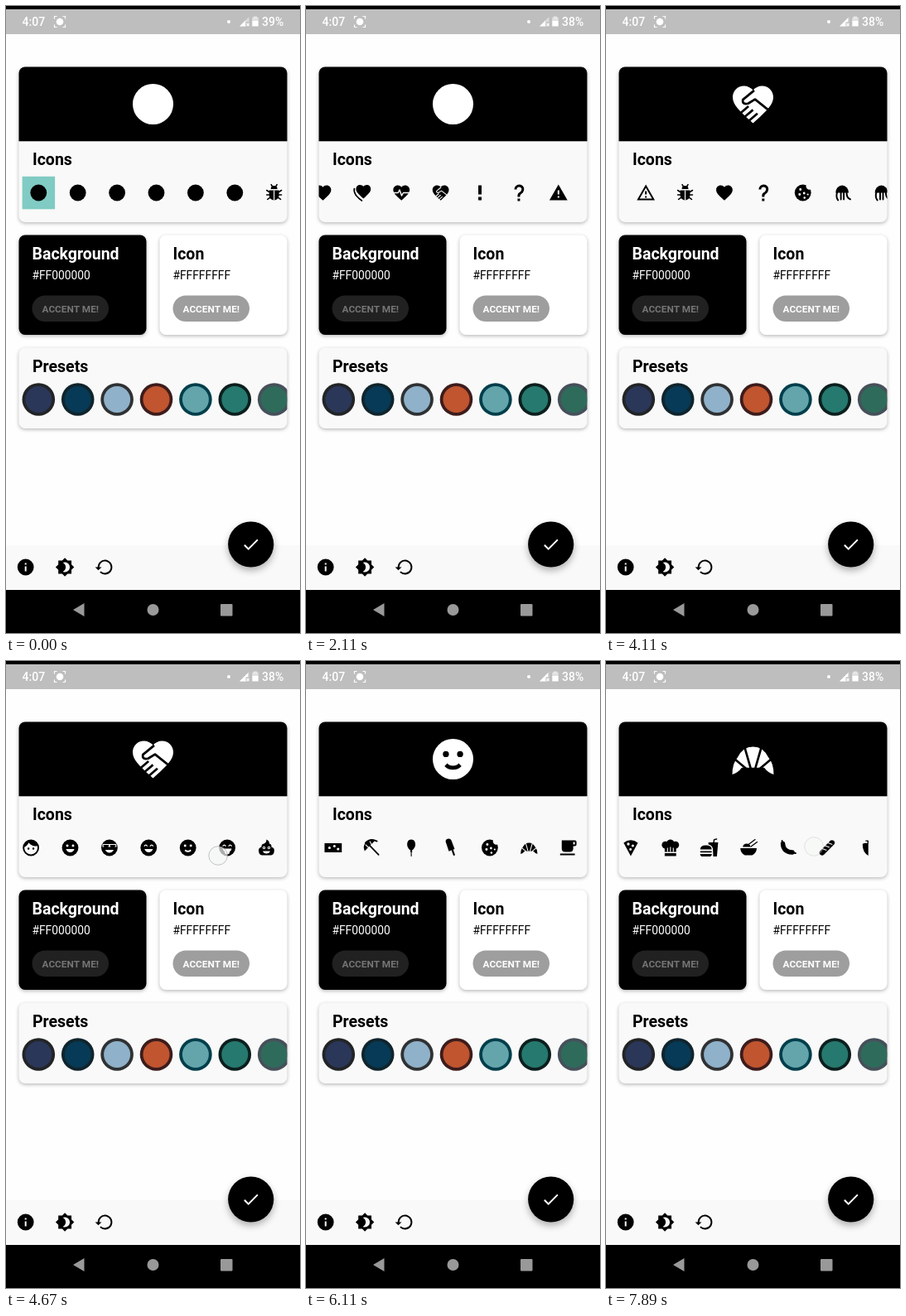
Recreate the animation shown at these times as an HTML page with a canvas. Size 355 by 757 pixels, loop 8000 ms.

```html
<!DOCTYPE html>
<html lang="en">
<head>
<meta charset="utf-8">
<title>Icon picker</title>
<style>
  html, body { margin: 0; width: 100%; height: 100%; overflow: hidden; background: #fdfefd; }
  canvas { display: block; }
</style>
</head>
<body>
<canvas id="stage" width="355" height="757"></canvas>
<script>
const ctx = document.getElementById('stage').getContext('2d');
const LOOP = 8000, PITCH = 47.4, FIRST = 39.3;
const PAGE = '#fdfefd', CARD = '#f8f9f8', TEAL = '#80cbc4';

const dot = (x, y, r) => `M${x - r} ${y}a${r} ${r} 0 1 0 ${2 * r} 0a${r} ${r} 0 1 0 ${-2 * r} 0Z`;
const DISC = 'F ' + dot(12, 12, 10);
const EYES = 'X ' + dot(8.5, 9.5, 1.5) + dot(15.5, 9.5, 1.5);
const ARC_EYES = 'C1.4 M6.5 10.2Q8.5 7 10.3 10.2M13.7 10.2Q15.5 7 17.5 10.2';
const GRIN = 'X M12 17.5C9.67 17.5 7.69 16.04 6.89 13.5H17.11C16.31 16.04 14.33 17.5 12 17.5Z';
const HEART = 'F M12 21.35L10.55 20.03C5.4 15.36 2 12.27 2 8.5C2 5.41 4.42 3 7.5 3C9.24 3 10.91 3.81 12 5.08C13.09 3.81 14.76 3 16.5 3C19.58 3 22 5.41 22 8.5C22 12.27 18.6 15.36 13.45 20.03Z';

// Layers on a 24-unit grid: F fill, X fill in backdrop, S stroke, C stroke in backdrop (with width).
const ICONS = {
  disc: [DISC],
  bug: ['F M8 7.5A4 4 0 0 1 16 7.5ZM6 9H18V15A6 6 0 0 1 6 15Z', 'C1.2 M12 9V21',
    'S1.6 M8.5 2L10 4.5M15.5 2L14 4.5M3 9L6 11M21 9L18 11M3 14.5H6M21 14.5H18M4 20L7 18M20 20L17 18'],
  heart: [HEART],
  hearts: ['F M13.5 19L12 17.7C7.6 13.7 4.5 11 4.5 7.5C4.5 4.5 6.8 2.5 9.3 2.5C11 2.5 12.5 3.2 13.5 4.4C14.5 3.2 16 2.5 17.7 2.5C20.3 2.5 22.5 4.5 22.5 7.5C22.5 11 19.4 13.7 15 17.7Z',
    'S1.7 M2.4 7C1 13 6 17 11.5 21.6'],
  pulse: [HEART, 'C1.5 M1 12H8L9.7 8.5L12.3 15.5L14.3 12H23'],
  hands: [HEART, 'C1.1 M12.6 5.2L7 9.8Q6.6 12.4 9.6 11.7L13 9.6L20 15.2M9.8 13L5.4 16.8M12 14.8L7.6 18.5M14.2 16.6L9.8 20.4'],
  bang: ['F M10 3H14V14H10ZM10 17H14V21H10Z'],
  help: ['F M10 19H13V22H10V19M12 2C17.35 2.22 19.68 7.62 16.5 11.67C15.67 12.67 14.33 13.33 13.67 14.17C13 15 13 16 13 17H10C10 15.33 10 13.92 10.67 12.92C11.33 11.92 12.67 11.33 13.5 10.67C15.92 8.43 15.32 5.26 12 5A3 3 0 0 0 9 8H6A6 6 0 0 1 12 2Z'],
  alert: ['F M13 14H11V9H13ZM13 18H11V16H13ZM1 21H23L12 2Z'],
  alertLine: ['F M12 2L1 21H23ZM12 6L19.53 19H4.47ZM11 10V14H13V10ZM11 16V18H13V16Z'],
  jelly: ['F M4 12A8 9 0 0 1 20 12Z', 'S2 M6 11Q4 17 7 21M10.5 11V20M14 11V20M17.5 11Q17 18 22 20'],
  face: ['F ' + dot(9, 13, 1.25) + dot(15, 13, 1.25) + dot(12, 12, 10) +
    'M12 20C7.59 20 4 16.41 4 12C4 11.71 4 11.42 4.05 11.14C6.41 10.09 8.28 8.16 9.26 5.77C11.07 8.33 14.05 10 17.42 10C18.2 10 18.95 9.91 19.67 9.74C19.88 10.45 20 11.21 20 12C20 16.41 16.41 20 12 20Z'],
  smiley: [DISC, EYES, GRIN],
  cool: [DISC, 'X M3.5 7.5H20.5V11H3.5Z', 'F M4.5 8.5H11.2Q11 12.5 8 12.5T4.5 8.5ZM12.8 8.5H19.5Q19 12.5 16 12.5T12.8 8.5Z',
    'X M12 18C9.6 18 7.7 16.8 6.9 14.6H17.1C16.3 16.8 14.4 18 12 18Z'],
  happy: [DISC, ARC_EYES, GRIN],
  smile: [DISC, EYES, 'X M12 17.23C10.25 17.23 8.71 16.5 7.81 15.42L9.23 14C9.68 14.72 10.75 15.23 12 15.23C13.25 15.23 14.32 14.72 14.77 14L16.19 15.42C15.29 16.5 13.75 17.23 12 17.23Z'],
  tongue: [DISC, ARC_EYES, 'X M6.5 13H17.5Q17 16 15 16.5V17A3 3 0 0 1 9 17V16.5Q7 16 6.5 13Z', 'C1 M12 16V19'],
  swirl: ['F M12 2Q16 4 15.5 7Q18.5 7.5 18 11Q22 12 21.5 16Q21 21 17 21H7Q3 21 2.5 16Q2 12 6 11Q5.5 7.5 9 7Q12 6 12 2Z',
    'X ' + dot(9, 12, 1.8) + dot(15, 12, 1.8) + 'M7.5 16H16.5Q15.5 19 12 19T7.5 16Z', 'F ' + dot(9, 12, .8) + dot(15, 12, .8)],
  ticket: ['F M2 6.5H23V17.5H2Z', 'X ' + dot(14, 10, 1.6) + dot(18.5, 13.5, 1.6) + dot(8, 12, 1.6)],
  umbrella: ['F M3 16A9.8 9.8 0 0 1 16 3Z', 'C1.1 M4 8L9 13M9 3.5L12 9', 'S1.8 M9 9L20 20.5M4 6Q10 0 18 4'],
  balloon: ['F M12 2C8.5 2 7 5 7 8C7 11.5 9.5 14.5 11.3 15.3L10.5 17H13.5L12.7 15.3C14.5 14.5 17 11.5 17 8C17 5 15.5 2 12 2Z', 'S1.1 M12 16V22'],
  pop: ['F M6.5 6A3.5 3.5 0 0 1 13 3L17 13.5L10 16.3Z', 'S2.2 M14.3 15L16.3 20.5'],
  cookie: [DISC, 'X ' + dot(20, 4, 4.2) + dot(9, 8, 1.5) + dot(8, 14, 1.5) + dot(13.5, 12.5, 1.4) + dot(14, 18, 1.3) + dot(18, 14, 1.1)],
  croissant: ['F M1.8 19.6Q1.8 14 4.5 11Q7 6 12 5.9Q17 6 19.5 11Q22.2 14 22.2 19.6Q19.5 18.8 17.5 16.2H6.5Q4.5 18.8 1.8 19.6Z',
    'C1.1 M7.7 5.5L11 17M16.3 5.5L13 17M2.8 11.8L9 17M21.2 11.8L15 17'],
  coffee: ['F M2 21H20V19H2ZM20 8H18V5H20ZM20 3H4V13A4 4 0 0 0 8 17H14A4 4 0 0 0 18 13V10H20A2 2 0 0 0 22 8V5C22 3.89 21.1 3 20 3Z'],
  pizza: ['F M12 22L3.3 6Q12 -.5 20.7 6Z', 'X ' + dot(9, 7.5, 1.7) + dot(14.5, 9.5, 1.6) + dot(11.7, 14, 1.5)],
  chef: ['F M12.5 2C10.5 2 8.9 3 8.3 4.5A4.5 4.5 0 1 0 5.5 13V17H19.5V13A4.5 4.5 0 1 0 16.7 4.5C16 3 14.5 2 12.5 2ZM5.5 18.5H19.5V22H5.5Z', 'C1.1 M9 17V12M12.5 17V11M16 17V12'],
  burger: ['F M1 14Q1 9 8 9T15 14ZM1 16H15V17.7H1ZM1 19.6H15V21L13.5 22.5H2.5L1 21ZM16.8 22.5L16.4 13Q15 8.5 11 8V5.5H22.8L21.3 22.5Z', 'S1.5 M17.3 6L18 2L21 1.3'],
  noodles: ['F M2 12.5H22A10 10 0 0 1 16.5 21H7.5A10 10 0 0 1 2 12.5ZM5 11A4.8 4.8 0 0 1 14.5 11Z', 'S1.3 M12 8L20 2M15 10.5L22.5 5'],
  sausage: ['S5.5 M6 7Q6.5 17 17.5 17.5', 'S2 M5 3.5L6 6M19 18L21.5 18.5'],
  baguette: ['S6.5 M6 18L18 6', 'C1.1 M6 13L11.5 15M9.5 9.5L15 11.5M13 6L18.5 8'],
  chili: ['F M7.5 8Q8 5.5 14.5 6.5V21.5Q7.5 18 7.5 8Z', 'S1.4 M14 6V3.5H11.5'],
  info: ['F M13 9H11V7H13ZM13 17H11V11H13Z' + dot(12, 12, 10)],
  theme: ['F M12 18C11.11 18 10.26 17.8 9.5 17.45C11.56 16.5 13 14.42 13 12C13 9.58 11.56 7.5 9.5 6.55C10.26 6.2 11.11 6 12 6A6 6 0 0 1 18 12A6 6 0 0 1 12 18ZM20 8.69V4H15.31L12 .69L8.69 4H4V8.69L.69 12L4 15.31V20H8.69L12 23.31L15.31 20H20V15.31L23.31 12Z'],
  undo: ['F M13 3A9 9 0 0 0 4 12H1L4.89 15.89L9 12H6A7 7 0 1 1 8.06 16.94L6.64 18.36A9 9 0 1 0 13 3Z'],
  check: ['F M9 16.17L4.83 12L3.41 13.41L9 19L21 7L19.59 5.59Z']
};
const STRIP = ('disc disc disc disc disc disc bug jelly balloon cookie umbrella coffee heart heart hearts pulse hands bang help alert alertLine ' +
  'bug heart help cookie jelly jelly face smiley cool happy smile tongue swirl heart balloon pop cookie ticket ticket ' +
  'umbrella balloon pop cookie croissant coffee noodles pop cookie pizza chef burger noodles sausage baguette chili').split(' ');

// start, end, from, to, ease-out power
const SCROLLS = [
  [900, 2670, 0, 663.6, 2.73],
  [3970, 4650, 663.6, 1289, 2.5],
  [4680, 4950, 1289, 1252, 1.5],
  [5565, 6250, 1252, 1867, 2.5],
  [7090, 7880, 1867, 2332, 2.5]
];
// time, strip index
const PICKS = [[-2000, 0], [420, 4], [3800, 16], [5270, 31], [6800, 44]];
// start, end, x0, y0, x1, y1, opacity
const TOUCHES = [
  [330, 460, 230, 228, 230, 228, .7],
  [880, 1060, 285, 228, 110, 225, .7],
  [3720, 3860, 135, 228, 135, 228, .7],
  [3950, 4110, 290, 230, 120, 226, .7],
  [4670, 4950, 256, 235, 293, 232, .7],
  [5190, 5310, 258, 226, 258, 226, .7],
  [5560, 5740, 277, 220, 110, 222, .9],
  [6780, 6930, 269, 228, 269, 228, .6],
  [7080, 7240, 280, 225, 110, 224, .7],
  [7860, 8000, 251, 224, 251, 224, .3]
];
const PRESETS = [['#222426', '#2a3759'], ['#10242c', '#063a56'], ['#2f3133', '#8fb1c9'], ['#3d1c1c', '#c0552f'],
  ['#003e4b', '#63a5ab'], ['#0c1f1e', '#26796e'], ['#46505a', '#2f6b5b']];

const paths = new Map();
function pathOf(d) {
  if (!paths.has(d)) paths.set(d, new Path2D(d));
  return paths.get(d);
}

function icon(name, x, y, scale, fg, bg) {
  ctx.save();
  ctx.translate(x - 12 * scale, y - 12 * scale);
  ctx.scale(scale, scale);
  ctx.lineJoin = 'round';
  for (const layer of ICONS[name]) {
    const cut = layer.indexOf(' '), kind = layer[0], path = pathOf(layer.slice(cut + 1));
    if (kind === 'F' || kind === 'X') {
      ctx.fillStyle = kind === 'F' ? fg : bg;
      ctx.fill(path, 'evenodd');
    } else {
      ctx.strokeStyle = kind === 'S' ? fg : bg;
      ctx.lineWidth = +layer.slice(1, cut);
      ctx.lineCap = kind === 'S' ? 'round' : 'butt';
      ctx.stroke(path);
    }
  }
  ctx.restore();
}

function rect(x, y, w, h, color) {
  ctx.fillStyle = color;
  ctx.fillRect(x, y, w, h);
}

function circle(x, y, r, color) {
  ctx.fillStyle = color;
  ctx.beginPath();
  ctx.arc(x, y, r, 0, 7);
  ctx.fill();
}

function poly(color, ...pts) {
  ctx.fillStyle = color;
  ctx.beginPath();
  for (let i = 0; i < pts.length; i += 2) ctx.lineTo(pts[i], pts[i + 1]);
  ctx.fill();
}

function round(x, y, w, h, r, color) {
  ctx.fillStyle = color;
  ctx.beginPath();
  ctx.roundRect(x, y, w, h, r);
  ctx.fill();
}

function shadowed(blur, dy, alpha, draw) {
  ctx.save();
  ctx.shadowColor = `rgba(0,0,0,${alpha})`;
  ctx.shadowBlur = blur;
  ctx.shadowOffsetY = dy;
  draw();
  ctx.restore();
}

const card = (x, y, w, h, color) => shadowed(4, 1.5, .28, () => round(x, y, w, h, 7.5, color));

function text(s, x, y, size, weight, color, align = 'left') {
  ctx.font = `${weight} ${size}px Roboto, sans-serif`;
  ctx.textAlign = align;
  ctx.fillStyle = color;
  ctx.fillText(s, x, y);
}

const title = (s, x, y, color = '#000') => text(s, x, y, 19.5, 700, color);

function clipped(x, y, w, h, draw) {
  ctx.save();
  ctx.beginPath();
  ctx.roundRect(x, y, w, h, 7.5);
  ctx.clip();
  draw();
  ctx.restore();
}

function scrollAt(t) {
  let pos = 0;
  for (const [a, b, from, to, power] of SCROLLS) {
    if (t < a) break;
    const u = Math.min(1, (t - a) / (b - a));
    pos = from + (to - from) * (1 - (1 - u) ** power);
  }
  return pos;
}

function statusBar(t) {
  rect(0, 0, 355, 34, '#bebebe');
  rect(0, 0, 355, 4, '#000');
  text('4:07', 19.5, 24, 14, 500, '#fff');
  circle(65, 19, 4.3, '#fff');
  ctx.strokeStyle = '#fff';
  ctx.lineWidth = 1.2;
  ctx.beginPath();
  for (const sx of [-1, 1]) for (const sy of [-1, 1]) {
    ctx.moveTo(65 + sx * 6.5, 19 + sy * 3.5);
    ctx.lineTo(65 + sx * 6.5, 19 + sy * 6.5);
    ctx.lineTo(65 + sx * 3.5, 19 + sy * 6.5);
  }
  ctx.stroke();
  circle(269, 19, 2, '#fff');
  const level = t < 4000 ? 7 : 10;
  poly('rgba(255,255,255,.45)', 282, 24.5, 293.5, 24.5, 293.5, 13);
  poly('#fff', 282, 24.5, 282 + level, 24.5, 282 + level, 24.5 - level);
  rect(289.5, 19.5, 4, 5, '#bebebe');
  ctx.beginPath();
  ctx.moveTo(290.5, 21); ctx.lineTo(293.5, 24);
  ctx.moveTo(293.5, 21); ctx.lineTo(290.5, 24);
  ctx.stroke();
  rect(299, 12.5, 4, 2, 'rgba(255,255,255,.55)');
  rect(297.3, 13.7, 7.4, 5, 'rgba(255,255,255,.55)');
  rect(297.3, 18, 7.4, 6.5, '#fff');
  text(t < 1500 ? '39%' : '38%', 309, 24, 14, 500, '#fff');
}

function iconCard(t) {
  const [pickTime, picked] = PICKS.filter(p => p[0] <= t).pop();
  const scroll = scrollAt(t);
  card(15.5, 73.5, 324, 187.5, CARD);
  clipped(15.5, 73.5, 324, 187.5, () => {
    rect(15, 73, 325, 90.3, '#000');
    icon(STRIP[picked], 177.5, 118.5, 2.45, '#fff', '#000');
    STRIP.forEach((name, i) => {
      const x = FIRST + i * PITCH - scroll, y = 225.5;
      if (x < -10 || x > 365) return;
      const on = i === picked;
      if (on) rect(x - 19.7, y - 19.7, 39.5, 39.5, TEAL);
      icon(name, x, y, .99, '#000', on ? TEAL : CARD);
      const age = t - pickTime;
      if (on && age < 350) {
        ctx.save();
        ctx.beginPath();
        ctx.rect(x - 19.7, y - 19.7, 39.5, 39.5);
        ctx.clip();
        circle(x, y, 9 + age * .11, `rgba(60,90,86,${.24 * (1 - age / 350)})`);
        ctx.restore();
      }
    });
  });
  title('Icons', 32, 192);
}

function colorCard(x, w, bg, fg, label, hex, pill, pillText) {
  card(x, 276.5, w, 120.5, bg);
  title(label, x + 16, 305.5, fg);
  text(hex, x + 16, 330, 13.8, 400, fg);
  round(x + 16, 349.5, 92.5, 31.5, 15.75, pill);
  text('ACCENT ME!', x + 62.3, 369.5, 11.8, 700, pillText, 'center');
}

function presetCard() {
  card(15.5, 412.5, 324, 97.5, CARD);
  title('Presets', 32, 441.5);
  clipped(15.5, 412.5, 324, 97.5, () => PRESETS.forEach(([ring, fill], i) => {
    const x = FIRST + i * PITCH;
    circle(x, 475, 19.8, ring);
    circle(x, 475, 16, fill);
  }));
}

function bottomBar() {
  rect(0, 651, 355, 54, CARD);
  ['info', 'theme', 'undo'].forEach((name, i) => icon(name, 23.7 + i * PITCH, 677.5, .99, '#000', CARD));
  shadowed(9, 4, .3, () => circle(295.7, 650, 27.6, '#000'));
  icon('check', 295.7, 650, .99, '#fff', '#000');
  rect(0, 705, 355, 52, '#000');
  poly('#999', 81, 729, 94.5, 721, 94.5, 737);
  circle(177.5, 729, 7, '#999');
  round(259, 722, 14.5, 14.5, 1, '#999');
}

function touches(t) {
  for (const [a, b, x0, y0, x1, y1, alpha] of TOUCHES) {
    if (t < a || t > b) continue;
    const u = (t - a) / (b - a), x = x0 + (x1 - x0) * u, y = y0 + (y1 - y0) * u;
    circle(x, y, 11.3, `rgba(245,247,246,${alpha})`);
    ctx.strokeStyle = `rgba(120,125,123,${alpha * .6})`;
    ctx.lineWidth = 1;
    ctx.stroke();
  }
}

function frame(now) {
  const t = now % LOOP;
  rect(0, 0, 355, 757, PAGE);
  statusBar(t);
  iconCard(t);
  colorCard(15.5, 154, '#000', '#fff', 'Background', '#FF000000', '#212121', '#757575');
  colorCard(185.5, 154, '#fff', '#000', 'Icon', '#FFFFFFFF', '#9e9e9e', '#fff');
  presetCard();
  bottomBar();
  touches(t);
  requestAnimationFrame(frame);
}
requestAnimationFrame(frame);
</script>
</body>
</html>
```
